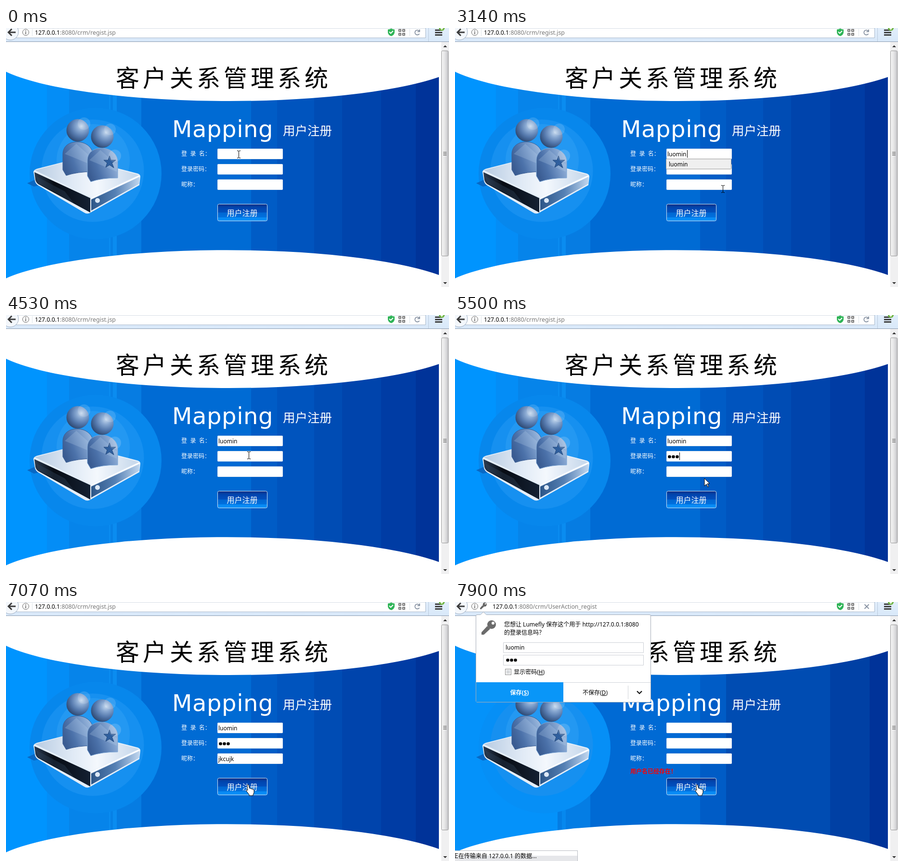
Recreate the animation shown at these times as an HTML page. Size 920 px wide and 539 px high, loop 8000 ms.

```html
<!DOCTYPE html>
<html lang="zh">
<head>
<meta charset="utf-8">
<title>用户注册</title>
<style>
html, body { margin: 0; width: 100%; height: 100%; overflow: hidden; background: #fff; }
svg { display: block; width: 920px; height: 539px; }
text { font: 12px "Noto Sans", "Noto Sans CJK SC", "Noto Sans CJK", sans-serif; white-space: pre; }
.label { fill: #fff; }
.mid { text-anchor: middle; }
.u { text-decoration: underline; }
.line { fill: none; stroke: #333; }
</style>
</head>
<body>
<svg viewBox="0 0 920 539">
  <defs>
    <clipPath id="band"><path d="M0 91A500 98 0 0 0 899 102V514A500 98 0 0 0 0 521Z"/></clipPath>
    <linearGradient id="bar" x2="0" y2="1"><stop stop-color="#e2eefb"/><stop offset="1" stop-color="#d8e8f9"/></linearGradient>
    <linearGradient id="thumb"><stop stop-color="#f6f6f6"/><stop offset=".5" stop-color="#e4e4e5"/><stop offset="1" stop-color="#c4c4c8"/></linearGradient>
    <linearGradient id="btn" x2="0" y2="1">
      <stop stop-color="#0a2f86"/><stop offset=".22" stop-color="#0046b0"/><stop offset=".5" stop-color="#0050be"/>
      <stop offset=".5" stop-color="#0066d2"/><stop offset=".78" stop-color="#0070de"/>
      <stop offset=".8" stop-color="#0688f2"/><stop offset="1" stop-color="#0a92fa"/>
    </linearGradient>
    <linearGradient id="stat" x2="0" y2="1"><stop offset=".5" stop-color="#fff"/><stop offset=".5" stop-color="#e6e7ea"/></linearGradient>
    <radialGradient id="ball" cx=".66" cy=".32" r=".75">
      <stop stop-color="#c4d8ee"/><stop offset=".3" stop-color="#86a6d0"/><stop offset=".62" stop-color="#5478ac"/><stop offset="1" stop-color="#2a456e"/>
    </radialGradient>
    <linearGradient id="body" x1="0" y1=".6" x2="1" y2=".2">
      <stop stop-color="#3a5c92"/><stop offset=".3" stop-color="#4c72aa"/><stop offset=".65" stop-color="#7799c8"/><stop offset="1" stop-color="#a4c0e2"/>
    </linearGradient>
    <linearGradient id="top"><stop stop-color="#b9cce2"/><stop offset=".35" stop-color="#dfe9f5"/><stop offset=".6" stop-color="#f4f8fd"/><stop offset="1" stop-color="#c4d6ea"/></linearGradient>
    <linearGradient id="dark"><stop stop-color="#2a3a50"/><stop offset=".35" stop-color="#070c14"/><stop offset="1" stop-color="#142032"/></linearGradient>
    <linearGradient id="side"><stop stop-color="#2d5688"/><stop offset=".5" stop-color="#5580b4"/><stop offset="1" stop-color="#c0d6ee"/></linearGradient>
    <path id="person" d="M0 58V26C0 8 14 0 30 0S63 10 63 30V62Q30 62 7 70Z"/>
    <g id="key"><circle cx="6" cy="-6" r="9"/><path d="M-3-3L3 3-10 15H-15V10Z"/><circle cx="9" cy="-9" r="3" fill="#fff"/></g>
  </defs>

  <rect width="920" height="539" fill="#fff"/>
  <g id="bands" clip-path="url(#band)"></g>

  <!-- two figures on a platform -->
  <path d="M44 323l18-8 10 12-14 3z" fill="#0868c4"/>
  <path d="M57 299Q58 295 64 293L150 271 274 303Q279 305 279 309L277 327 174 385Q168 388 162 384L66 327Q61 323 60 318Z" fill="#e4eef9"/>
  <path d="M60 296L150 272 276 306 177 352Z" fill="url(#top)"/>
  <path d="M59 300L175 354V384L67 325Q62 321 61 316Z" fill="url(#dark)"/>
  <path d="M62 308l60 32 20 26-74-43z" fill="#34485f" opacity=".35"/>
  <path d="M177 357L277 310V324L177 380Z" fill="url(#side)"/>
  <path d="M177 354L277 308" stroke="#fff" stroke-width="2"/>
  <circle cx="190" cy="359" r="5" fill="#dce8f6"/>
  <use href="#person" x="118" y="237" fill="url(#body)" stroke="#3a5d92"/>
  <path d="M122 262L146 241 178 270V285Z" fill="#c4d8f0" opacity=".22"/>
  <circle cx="149" cy="213" r="23.5" fill="url(#ball)"/>
  <use href="#person" x="169" y="250" fill="url(#body)" stroke="#7fa8d6"/>
  <path d="M173 275L196 254 230 284V299Z" fill="#c4d8f0" opacity=".22"/>
  <circle cx="200" cy="226" r="23.5" fill="url(#ball)"/>
  <path d="M215 266l3 9 10 0-8 6 4 10-9-6-8 5 3-9-7-6 9 0z" fill="#2f5f9e" stroke="#24497c"/>
  <circle cx="162" cy="199" r="13" fill="#fff" opacity=".14"/>
  <circle cx="216" cy="211" r="12" fill="#fff" opacity=".14"/>
  <circle cx="226" cy="266" r="13" fill="#fff" opacity=".16"/>

  <text x="228" y="121.5" style="font-size:49px;font-weight:300;letter-spacing:7px">客户关系管理系统</text>
  <text class="label" x="345" y="227" style="font:48px 'DejaVu Sans',sans-serif;letter-spacing:.6px">Mapping</text>
  <text class="label" x="575" y="223" style="font-size:25.5px">用户注册</text>
  <text class="label" x="364" y="266" style="word-spacing:3.3px">登 录 名：</text>
  <text class="label" x="364" y="298">登录密码：</text>
  <text class="label" x="364" y="330">昵称：</text>
  <g fill="#fff" stroke="#dfe7f0">
    <rect x="439.5" y="251.5" width="135" height="21" rx="1"/>
    <rect x="439.5" y="283.5" width="135" height="21" rx="1"/>
    <rect x="439.5" y="315.5" width="135" height="21" rx="1"/>
  </g>
  <rect x="439.5" y="366.5" width="103" height="35" rx="3" fill="url(#btn)" stroke="#d4e2f2"/>
  <text class="label mid" x="490.5" y="390.5" style="font-size:16px">用户注册</text>
  <text id="name" x="441" y="267"></text>
  <g id="dots"></g>
  <text id="nick" x="441" y="331"></text>
  <g id="drop">
    <rect id="item" x="438.5" y="272.5" width="135" height="21" rx="1" stroke="#999"/>
    <text x="444" y="288">luomin</text>
  </g>
  <rect id="caret" width="1" height="16"/>
  <text id="error" x="364" y="357" fill="#f00" style="font-weight:bold">用户名已经存在！</text>

  <!-- browser bar -->
  <rect width="920" height="28" fill="url(#bar)"/>
  <path d="M0 28.5H920" stroke="#8b9bb0"/>
  <path d="M15 0H871.5V20.5H15" fill="#fff" stroke="#a9b9cc"/>
  <circle cx="9" cy="8" r="17" fill="#f3f7fc" stroke="#9aabc0"/>
  <path d="M20 9H6M12 2L5 9l7 7" fill="none" stroke="#3c3c3c" stroke-width="3"/>
  <circle class="line" cx="41" cy="9" r="6.5" style="stroke:#666"/>
  <path d="M41 5v2M41 8v5" stroke="#666" stroke-width="1.6"/>
  <path d="M54.5 2V17M838.5 2V17" stroke="#dde2e8"/>
  <use id="barkey" href="#key" transform="translate(59 8)scale(.46)" fill="#666"/>
  <text id="url" y="14" style="font-size:12.3px"><tspan>127.0.0.1</tspan><tspan id="path" fill="#777"></tspan></text>
  <path d="M793 3q4 0 7-2 3 2 7 2v6q0 5-7 8-7-3-7-8z" fill="#2fb457"/>
  <path d="M796 8l3 3 5-5" fill="none" stroke="#fff" stroke-width="2"/>
  <path class="line" d="M816 3h4v4h-4zM824 3h4v4h-4zM816 11h4v4h-4zM824 11h4v4h-4z" style="stroke:#555;stroke-width:1.6"/>
  <g fill="none" stroke="#8792a2" stroke-width="1.8">
    <path id="reload" d="M858.5 12A5 5 0 1 1 858 6M859 3V7.5H854.5"/>
    <path id="stop" d="M850.5 5l9 9M859.5 5l-9 9"/>
  </g>
  <path d="M877.5 0V28" stroke="#b9c9dc"/>
  <path d="M891 4.5H906M891 9.5H906M891 14.5H906" stroke="#404040" stroke-width="3"/>
  <circle cx="905" cy="0" r="6" fill="#6db33f"/>
  <path d="M905 0v4M902 1h6" stroke="#fff" stroke-width="1.6"/>

  <!-- scroll bar -->
  <rect x="904" y="29" width="16" height="510" fill="#f0f0f1"/>
  <rect x="904.5" y="47.5" width="14" height="427" rx="2" fill="url(#thumb)" stroke="#979797"/>
  <path d="M908 40l4-4 4 4zM908 529h8l-4 4z" fill="#333"/>
  <path d="M908 258.5h7M908 261.5h7M908 264.5h7" stroke="#555"/>

  <g id="popup">
    <path d="M46 26.5H53L59 20.5 65 26.5H404Q406.5 26.5 406.5 29V205Q406.5 208.5 403 208.5H46Q43.5 208.5 43.5 205V29Q43.5 26.5 46 26.5Z" fill="#fff" stroke="#a5adb8"/>
    <use href="#key" transform="translate(70 53)" fill="#6b6b6b"/>
    <text x="102" y="51">您想让 Lumefly 保存这个用于 http://127.0.0.1:8080</text>
    <text x="102" y="68">的登录信息吗？</text>
    <path d="M100.5 84.5h291v21h-291zM100.5 110.5h291v21h-291z" fill="#fff" stroke="#ccd0d6"/>
    <text id="login" x="105" y="99"></text>
    <path d="M109.5 121h0M117.5 121h0M125.5 121h0" stroke="#000" stroke-width="6.5" stroke-linecap="round"/>
    <rect x="104.5" y="139.5" width="12" height="12" fill="#f4f4f4" stroke="#8e8f8f"/>
    <rect x="107" y="142" width="7" height="7" fill="#d6d9dc"/>
    <text x="122" y="150">显示密码(<tspan class="u">H</tspan>)</text>
    <rect id="no" x="225" y="167" width="181" height="41"/>
    <path d="M44 167.5H406M359.5 174V202" stroke="#d0d4d9"/>
    <rect x="44" y="167" width="181" height="41" fill="#0996f8"/>
    <text class="label mid" x="134" y="193" style="font-weight:bold">保存(<tspan class="u">S</tspan>)</text>
    <text class="mid" x="291" y="193">不保存(<tspan class="u">D</tspan>)</text>
    <path d="M378 185.5l5 5 5-5" fill="none" stroke="#111" stroke-width="2.2"/>
  </g>
  <g id="status">
    <rect x="-1" y="517.5" width="255.5" height="22" fill="url(#stat)" stroke="#b8bcc2"/>
    <text id="msg" x="-5" y="533"></text>
  </g>
  <g id="cursor">
    <path id="beam" class="line" d="M-3-7.5h2l1.5 1 1.5-1h2M.5-7V7M-3 7.5h2l1.5-1 1.5 1h2" style="stroke:#000"/>
    <path id="arrow" d="M0 0V16l4-4 3 6 2-1-3-6h5z" fill="#fff" stroke="#000"/>
    <path id="hand" d="M-5-10q2-2 3 0l2 7q2-1 3 1 2-1 3 1 3-1 3 2v5l-2 4v2h-8v-2l-6-8q0-3 3-1z" fill="#fff" stroke="#000"/>
  </g>
</svg>
<script>
const $ = id => document.getElementById(id);
const last = (list, t) => list.findLast(step => step[0] <= t);
const count = (times, t) => times.filter(x => x <= t).length;
const show = (id, on) => $(id).style.display = on ? '' : 'none';

const fine = [[0, '#0094fe'], [85, '#048df6'], [131, '#0684ea'], [214, '#0a8cf0'], [217, '#0680e6'], [222, '#0a8cf0'],
  [230, '#067ce2'], [281, '#006bd4'], [509, '#005cc6'], [563, '#0054be'], [640, '#004cb4'], [698, '#0044ac'],
  [779, '#003ca4'], [851, '#003399']];
const coarse = [[0, '#0492fa'], [213, '#047de4'], [222, '#0688ee'], [230, '#047de4'], [281, '#006ad4'], [509, '#005cc6'],
  [563, '#004cb2'], [779, '#0040a4'], [861, '#003399']];
const cursors = [[0, 483, 263, 'beam'], [3140, 556, 335, 'beam'], [3280, 650, 326, 'arrow'], [3420, 688, 326, 'arrow'],
  [3700, 650, 290, 'arrow'], [3840, 548, 293, 'beam'], [3980, 512, 292, 'beam'], [4100, 504, 292, 'beam'],
  [5360, 510, 308, 'arrow'], [5500, 518, 340, 'arrow'], [5640, 518, 325, 'beam'],
  [6925, 512, 352, 'arrow'], [7070, 506, 391, 'hand']];
const carets = [[0, -1], [280, 0], [810, -1], [1400, 0], [3560, -1], [4100, 1], [4530, -1], [4665, 1], [5780, 2], [7070, -1]];

function backdrop(phase) {
  const list = phase ? coarse : fine;
  const bars = list.map(([x, c], i) =>
    `<rect x="${x}" y="80" width="${(list[i + 1]?.[0] ?? 899) - x}" height="450" fill="${c}"/>`).join('');
  const disc = (x, y, r, c) => `<circle cx="${x}" cy="${y}" r="${r}" fill="${c}"/>`;
  $('bands').innerHTML = bars + disc(186, 303, 137, phase ? '#068ff6' : '#0787ec') +
    (phase === 1 ? disc(181, 276, 76, '#1a96f2') : disc(180, 297, 106.5, '#1690f0') + disc(181, 276, 76, '#2398f2'));
}

let shown = -1;
function draw(t) {
  const phase = t < 7780 ? 0 : t < 7900 ? 1 : 2;
  if (phase !== shown) backdrop(shown = phase);
  const sent = phase === 2;

  $('name').textContent = sent ? '' : 'luomin'.slice(0, count([1400, 1980, 2120, 2400, 2535, 2670], t));
  $('nick').textContent = sent ? '' : 'jkcujk'.slice(0, count([6060, 6200, 6340, 6490, 6635, 6780], t));
  const dots = sent ? 0 : count([4665, 4800, 5080], t);
  $('dots').innerHTML = [0, 1, 2].slice(0, dots).map(i => `<circle cx="${445.5 + 8 * i}" cy="295" r="3.3"/>`).join('');

  const field = last(carets, t)[1];
  const width = field === 1 ? dots * 8 : field < 0 ? 0 : $(field ? 'nick' : 'name').getComputedTextLength();
  show('caret', field >= 0);
  $('caret').setAttribute('x', 442 + Math.round(width));
  $('caret').setAttribute('y', 254 + 32 * Math.max(field, 0));

  show('drop', t >= 1550 && t < 3560);
  $('item').setAttribute('fill', t < 3140 ? '#fff' : '#efefef');
  show('error', sent);

  for (const id of ['popup', 'status', 'barkey', 'stop']) show(id, phase);
  show('reload', !phase);
  $('url').setAttribute('x', phase ? 78 : 60);
  $('path').textContent = ':8080/crm/' + (sent ? 'UserAction_regist' : 'regist.jsp');
  $('popup').setAttribute('transform', sent ? '' : 'translate(3.6 1.56)scale(.94)');
  $('popup').setAttribute('opacity', sent ? 1 : .88);
  $('no').setAttribute('fill', sent ? '#fff' : '#e9edf1');
  $('login').textContent = sent ? 'luomin' : 'tianrong';
  $('msg').textContent = sent ? '正在传输来自 127.0.0.1 的数据...' : '正在发送请求到 127.0.0.1...';

  const [, x, y, kind] = last(cursors, t);
  $('cursor').setAttribute('transform', `translate(${x} ${y})`);
  for (const id of ['beam', 'arrow', 'hand']) show(id, id === kind);
}

const start = performance.now();
function tick() {
  draw((performance.now() - start) % 8000);
  requestAnimationFrame(tick);
}
tick();
</script>
</body>
</html>
```
